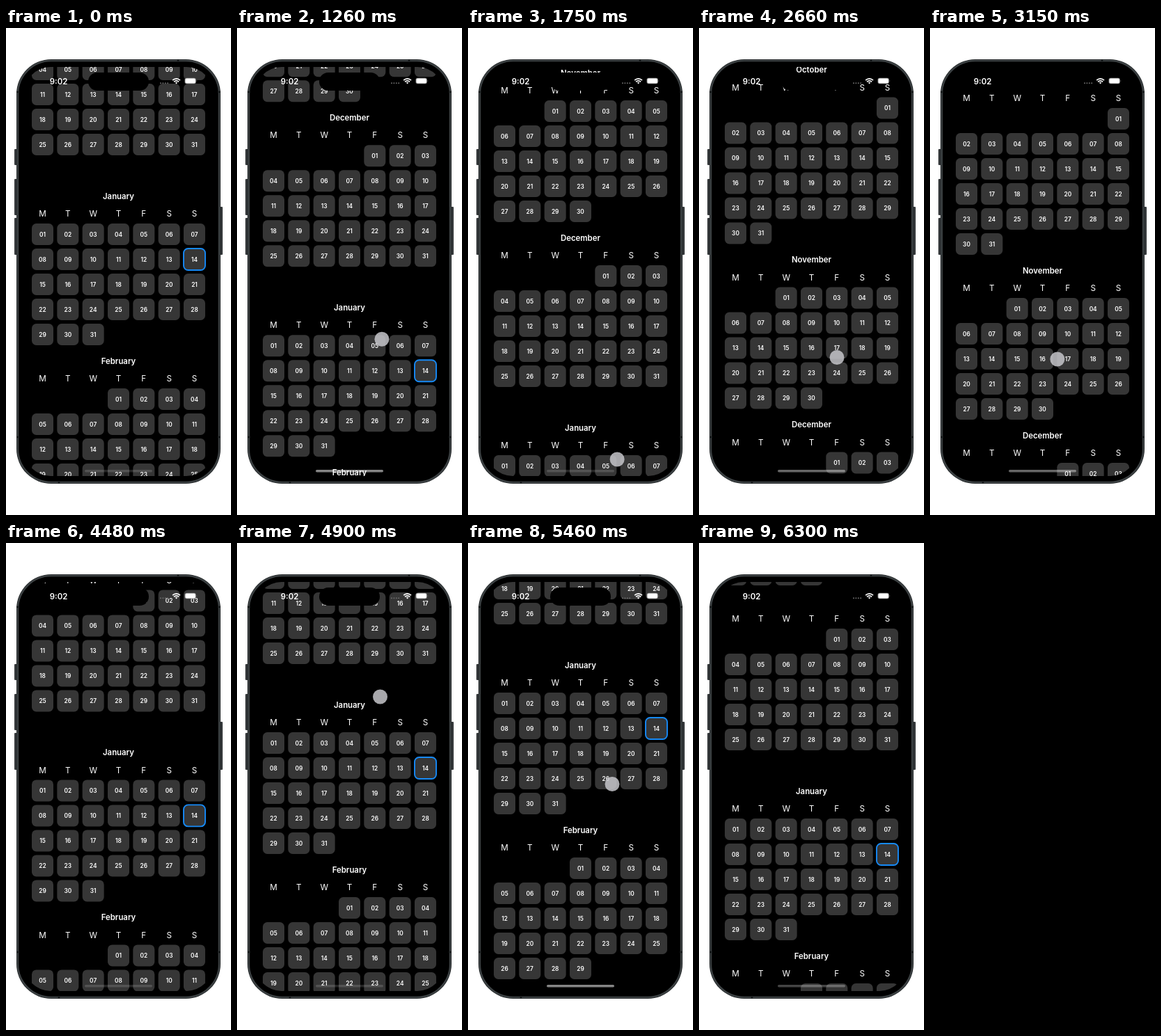
Write an HTML page that moves like this. It is 323x700 px and loops after 7740 ms.

```html
<!DOCTYPE html>
<html lang="en">
<head>
<meta charset="utf-8">
<title>Calendar scroll</title>
<style>
  html, body { margin: 0; width: 100%; height: 100%; overflow: hidden; background: #fff; }
  svg { display: block; width: 323px; height: 700px; }
  text { font-family: Inter, Roboto, sans-serif; fill: #fff; text-anchor: middle; }
  .title { font-size: 11.4px; font-weight: 600; }
  .week { font-size: 11.7px; }
  .day { font-size: 8.3px; font-weight: 600; }
  .cell { fill: #363636; }
  .today { stroke: #168af7; stroke-width: 1.9; }
</style>
</head>
<body>
<svg viewBox="0 0 323 700">
  <defs>
    <clipPath id="screen"><rect x="26" y="56" width="271" height="588" rx="38"/></clipPath>
  </defs>

  <g fill="#34383a">
    <rect x="12" y="174" width="5" height="23" rx="1"/>
    <rect x="12" y="217" width="5" height="52" rx="1"/>
    <rect x="12" y="273" width="5" height="53" rx="1"/>
    <rect x="306" y="257" width="5" height="69" rx="1"/>
  </g>
  <rect x="15" y="45" width="293" height="610" rx="50" fill="#202425"/>
  <rect x="17" y="47" width="289" height="606" rx="48" fill="#000" stroke="#3c4143" stroke-width="2.4"/>
  <path d="M15 92h4M304 92h4M15 588h4M304 588h4M247 45v4M76 651v4" stroke="#1a1d1e" stroke-width="2.5"/>

  <g clip-path="url(#screen)"><g id="months"></g></g>

  <rect x="118" y="64" width="87" height="26" rx="13"/>
  <text class="title" x="75.5" y="80.5">9:02</text>
  <g fill="#6a6a6a">
    <circle cx="222" cy="79.2" r="1"/><circle cx="225.4" cy="79.2" r="1"/>
    <circle cx="228.8" cy="79.2" r="1"/><circle cx="232.2" cy="79.2" r="1"/>
  </g>
  <g fill="none" stroke="#fff" stroke-width="1.7">
    <path d="M239.2 75.2a7.6 7.6 0 0 1 10.8 0M241.1 77.3a4.9 4.9 0 0 1 7 0"/>
    <path d="M244.6 80.4l-1.7-1.8a2.4 2.4 0 0 1 3.4 0z" fill="#fff" stroke="none"/>
  </g>
  <rect x="256.5" y="71.7" width="16.4" height="8.6" rx="2.7" fill="#777"/>
  <rect x="257.4" y="72.5" width="14.6" height="7" rx="2" fill="#fff"/>
  <path d="M273.6 74.7q1.3 1.3 0 2.7z" fill="#888"/>

  <rect id="bar" x="113" y="635" width="97" height="3.4" rx="1.7" fill="#fff"/>
  <circle id="finger" fill="#c6c5ca"/>
</svg>

<script>
(() => {
  const LOOP = 7740, STEP = 70, PITCH = 36, SIZE = 31;
  const BAR = { left: 113, right: 210, top: 635, bottom: 638.4 };

  // name, weekday of the 1st (Monday = 0), days
  const MONTHS = [
    ['September', 4, 30], ['October', 6, 31], ['November', 2, 30], ['December', 4, 31],
    ['January', 0, 31], ['February', 3, 29], ['March', 4, 31]
  ];

  // time, height of the January title
  const SCROLL = [
    [630, 242], [1050, 330], [1400, 455], [1750, 575], [1820, 593], [2380, 720],
    [2730, 870], [2940, 923], [3150, 859], [3430, 663], [3850, 524.5], [4130, 367],
    [4550, 290], [4900, 233], [4970, 217], [5320, 150], [5460, 176], [5740, 300], [6300, 357]
  ];

  // press, release, x at press, x at release, finger height relative to the January title
  const TOUCHES = [
    [630, 1820, 200, 215, 45],
    [2380, 2730, 190, 200, -370],
    [2940, 3430, 179, 188, -383],
    [3850, 4130, 193, 203, -167.5],
    [4550, 4970, 203, 206, -12],
    [5320, 5740, 206, 209, 170.5]
  ];

  const months = document.getElementById('months');
  const bar = document.getElementById('bar');
  const finger = document.getElementById('finger');
  const cells = [];

  function add(tag, attrs, text) {
    const el = document.createElementNS('http://www.w3.org/2000/svg', tag);
    for (const k in attrs) el.setAttribute(k, attrs[k]);
    if (text) el.textContent = text;
    months.append(el);
  }

  const colX = i => 52.5 + i * 36.33;
  const rowCount = ([, first, days]) => Math.floor((first + days) / 7) + 1;
  const heightOf = m => 57 + PITCH * rowCount(m);

  function addMonth([name, first, days], y0) {
    add('text', { class: 'title', x: 161.5, y: y0 + 4 }, name);
    [...'MTWTFSS'].forEach((d, i) => add('text', { class: 'week', x: colX(i), y: y0 + 29.2 }, d));
    for (let d = 1; d <= days; d++) {
      const slot = first + d - 1;
      const x = colX(slot % 7), y = y0 + 54.5 + PITCH * Math.floor(slot / 7);
      const today = name === 'January' && d === 14;
      add('rect', {
        class: today ? 'cell today' : 'cell',
        x: x - SIZE / 2, y: y - SIZE / 2, width: SIZE, height: SIZE, rx: 6.5
      });
      add('text', { class: 'day', x, y: y + 3 }, String(d).padStart(2, '0'));
      cells.push([x, y]);
    }
  }

  // January sits at height 0 of the list
  let monthY = -MONTHS.slice(0, 4).reduce((sum, m) => sum + heightOf(m), 0);
  for (const m of MONTHS) {
    addMonth(m, monthY);
    monthY += heightOf(m);
  }

  // Monotone cubic through the scroll points
  const slopes = SCROLL.slice(1).map(([t, y], i) => (y - SCROLL[i][1]) / (t - SCROLL[i][0]));
  const tangents = SCROLL.map((_, i) => {
    const a = slopes[i - 1], b = slopes[i];
    return a * b > 0 ? 2 * a * b / (a + b) : 0;
  });

  function scrollAt(t) {
    const last = SCROLL.length - 1;
    if (t <= SCROLL[0][0]) return SCROLL[0][1];
    if (t >= SCROLL[last][0]) return SCROLL[last][1];
    const i = SCROLL.findIndex(p => p[0] > t) - 1;
    const [t0, y0] = SCROLL[i], [t1, y1] = SCROLL[i + 1];
    const h = t1 - t0, u = (t - t0) / h, v = 1 - u;
    return y0 * (1 + 2 * u) * v * v + tangents[i] * h * u * v * v
         + y1 * u * u * (3 - 2 * u) - tangents[i + 1] * h * u * u * v;
  }

  const overlap = (a, b, c, d) => Math.max(0, Math.min(b, d) - Math.max(a, c));

  // Share of the home bar that lies over cells
  function barCover(y) {
    const half = SIZE / 2;
    const area = cells.reduce((sum, [cx, cy]) => sum
      + overlap(cx - half, cx + half, BAR.left, BAR.right)
      * overlap(cy + y - half, cy + y + half, BAR.top, BAR.bottom), 0);
    return area / (BAR.right - BAR.left) / (BAR.bottom - BAR.top);
  }

  function drawFinger(t) {
    const touch = TOUCHES.find(([a, b]) => t >= a && t < b + 140);
    if (!touch) {
      finger.setAttribute('opacity', 0);
      return;
    }
    const [a, b, x0, x1, dy] = touch;
    const held = Math.min(t, b), gone = Math.max(0, (t - b) / 140);
    const grow = Math.max(0, 1 - (t - a) / 100, gone);
    finger.setAttribute('cx', x0 + (x1 - x0) * (held - a) / (b - a));
    finger.setAttribute('cy', scrollAt(held) + dy);
    finger.setAttribute('r', 10.5 + 4.7 * grow);
    finger.setAttribute('opacity', 0.85 * (1 - gone));
  }

  function draw(now) {
    const t = Math.floor((now % LOOP) / STEP) * STEP;
    const y = scrollAt(t);
    months.setAttribute('transform', `translate(0 ${y})`);
    bar.setAttribute('opacity', 0.52 - 0.42 * barCover(y));
    drawFinger(t);
  }

  let start;
  function tick(now) {
    start ??= now;
    draw(now - start);
    requestAnimationFrame(tick);
  }
  draw(0);
  requestAnimationFrame(tick);
})();
</script>
</body>
</html>
```
